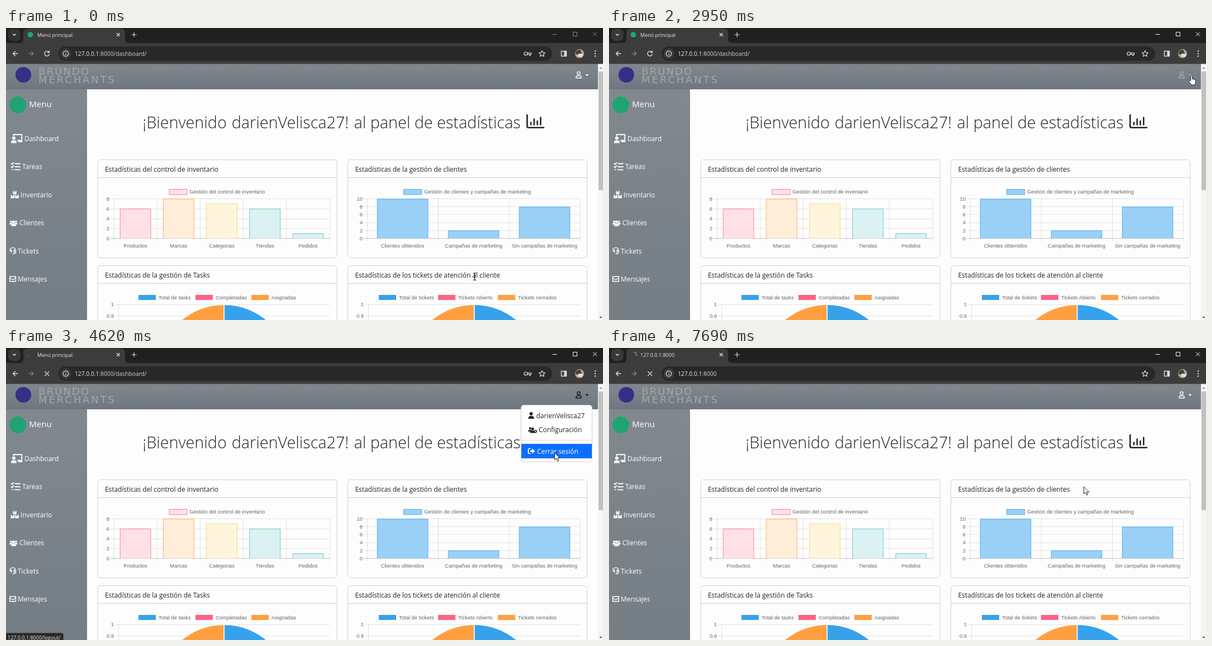
An HTML page that plays this animation: 1068x524 px, repeating every 7990 ms.

```html
<!DOCTYPE html>
<html lang="es">
<head>
<meta charset="utf-8">
<title>Menú principal</title>
<style>
  html, body { margin: 0; width: 100%; height: 100%; overflow: hidden; background: #fdfdfd; }
  svg { display: block; position: absolute; left: 0; top: 0; }
  text { font-family: "Open Sans", "Noto Sans", sans-serif; font-size: 11.9px; fill: #212529; }
  .chart text { font-family: "Liberation Sans", Arial, sans-serif; font-size: 9.45px; fill: #666; }
  .title text { font-size: 28.75px; font-weight: 300; text-anchor: middle; }
  .side text { fill: #fff; }
  .brand text { font-family: "DejaVu Sans", sans-serif; fill: #a6a6a6; }
  .ui text { fill: #e8e8e8; font-size: 9px; }
  .line { fill: none; stroke: currentColor; stroke-width: 1.4; stroke-linecap: round; stroke-linejoin: round; }
  .solid { fill: currentColor; }
  .card { fill: #fdfdfd; stroke: #d2d2d2; }
</style>
</head>
<body>
<svg width="1068" height="524" viewBox="0 0 1068 524">
  <defs>
    <linearGradient id="bar" x2="0" y2="1">
      <stop stop-color="#80888f"/><stop offset="1" stop-color="#6e777f"/>
    </linearGradient>
    <linearGradient id="pane" x2="0" y2="1">
      <stop stop-color="#81898f"/><stop offset="1" stop-color="#757d85"/>
    </linearGradient>
    <g id="person">
      <circle cy="-3" r="3"/><path d="M-5.2 6q0-5 4-5h2.4q4 0 4 5z"/>
    </g>
  </defs>

  <rect width="1068" height="524" fill="#fdfdfd"/>
  <g class="title">
    <text x="319.5" y="180">¡Bienvenido</text>
    <text x="508.5" y="180">darienVelisca27!</text>
    <text x="771.5" y="180">al panel de estadísticas</text>
  </g>
  <path d="M932.3 156v20.5q0 2.3 2.3 2.3H962M939 169.5v4M944.8 163.5v10M950.6 167v6.5M956.4 160.5v13"
        class="line" style="color:#212529;stroke-width:2.6"/>
  <g id="cards"></g>
  <g id="charts" class="chart"></g>

  <!-- scrollbar -->
  <rect x="1059" y="65" width="9" height="459" fill="#f5f5f5"/>
  <rect x="1060" y="78" width="8" height="213" fill="#c1c1c1"/>
  <path d="M1061.5 73l2.5-3 2.5 3z" fill="#858585"/>
  <path d="M1061.5 518l2.5 3 2.5-3z" fill="#505050"/>

  <!-- page header -->
  <rect y="64" width="1059" height="46" fill="url(#bar)"/>
  <circle cx="31" cy="84" r="14" fill="#34308a"/>
  <g class="brand">
    <text x="58" y="83.5" style="font-size:18.5px;letter-spacing:1.7px">BRUNDO</text>
    <text x="58" y="99" style="font-size:18px;letter-spacing:2.9px">MERCHANTS</text>
  </g>
  <g id="account">
    <g class="line"><circle cx="1024.5" cy="81" r="2.6"/><path d="M1019.7 89.8q0-4.3 3.5-4.3h2.6q3.5 0 3.5 4.3z"/></g>
    <path d="M1036.5 83h6l-3 3.2z" class="solid"/>
  </g>

  <!-- sidebar -->
  <rect y="110" width="145" height="414" fill="url(#pane)"/>
  <circle cx="21" cy="138" r="15" fill="#1fa374"/>
  <g class="side" id="side" color="#fff">
    <text x="41.3" y="142" style="font-size:15px">Menu</text>
    <path d="M13.5 193v-1.8h14.8v10.6h-7.5M23 204h5.5" class="line" style="stroke-width:1.9"/>
    <g class="solid"><circle cx="14" cy="197.5" r="3"/><path d="M9 206.5q0-5 4-5h2q4 0 4 5z"/></g>
    <path d="M9.5 243.3l1.5 1.5 2.5-3M9.5 248.8l1.5 1.5 2.5-3M11 254h.5M16.5 243.5h8.5M16.5 249h8.5M15.5 254.3h9.5" class="line" style="stroke-width:1.8"/>
    <path d="M12.5 292.5h2v2.5h2v-2.5h2.2v5.8h-6.2zM8.5 299.5h2.3v2.5h2v-2.5h2.3v6h-6.6zM16.3 299.5h2.3v2.5h2v-2.5h2.3v6h-6.6z" class="solid"/>
    <g class="solid">
      <use href="#person" transform="translate(9 349) scale(.58)"/>
      <use href="#person" transform="translate(18 349) scale(.58)"/>
      <use href="#person" transform="translate(13.5 350.5) scale(.85)"/>
    </g>
    <path d="M6.8 399.5a5.3 5.3 0 0 1 10.6 0v2.5q0 3-3 3h-2.2" class="line" style="stroke-width:1.3"/>
    <path d="M8.3 397.8h2.2v5h-2.2zM13.7 397.8h2.2v5h-2.2z" class="solid"/>
    <path d="M6.7 446h10.8v8.8h-10.8zM6.7 448.3l5.4 3.7 5.4-3.7" class="line"/>
  </g>

  <!-- account menu -->
  <g id="menu">
    <rect x="921.5" y="102.5" width="127" height="102" rx="5" fill="#fff" stroke="#d0d2d4"/>
    <path d="M922 165.5h126" stroke="#d9d9d9"/>
    <rect id="row" x="922" y="172" width="126" height="26"/>
    <g color="#212529" class="solid">
      <use href="#person" x="939.5" y="121"/>
      <use href="#person" transform="translate(937.5 146) scale(.65)"/>
      <use href="#person" transform="translate(942 147.5) scale(.85)"/>
      <circle cx="947" cy="149.5" r="2" fill="none" stroke="#212529" stroke-width="1.7"/>
    </g>
    <text x="948.5" y="126">darienVelisca27</text>
    <text x="953" y="151">Configuración</text>
    <g id="exit">
      <path d="M938 180.5h-1.5q-2 0-2 2v5q0 2 2 2h1.5" class="line" style="stroke-width:1.7"/>
      <path d="M938 183.5h3.5v-3.3l4.7 4.8-4.7 4.8v-3.3h-3.5z" class="solid"/>
      <text x="950" y="189.5" style="fill:currentColor">Cerrar sesión</text>
    </g>
  </g>

  <!-- browser -->
  <g class="ui" color="#dcdcdc">
    <rect width="1068" height="28" fill="#1f2020"/>
    <rect y="27" width="1068" height="37.5" fill="#3c3c3c"/>
    <rect id="search" x="4" y="2" width="22" height="21" rx="7"/>
    <path d="M12.5 10.8l2.5 2.5 2.5-2.5" class="line"/>
    <path d="M24 27q7 0 7-7V9q0-8 8-8h166q8 0 8 8v11q0 7 7 7z" fill="#3c3c3c"/>
    <circle id="icon" cx="43.5" cy="12" r="5" fill="#1fa374"/>
    <circle id="spin" cx="44.5" cy="12" r="4.7" pathLength="360" fill="none" stroke-width="1.4"/>
    <text id="tab" x="56" y="15.5"></text>
    <path d="M198.3 9.5l5 5m0-5l-5 5M229 8v8m-4-4h8" class="line" style="stroke-width:1.2"/>
    <path id="win" d="M977.5 11.5h8M1014.5 7.5h7v7h-7zM1050 7.5l7 7m0-7l-7 7" fill="none"/>
    <path d="M21 46h-8.5m4-4l-4 4 4 4" class="line"/>
    <path d="M40.5 46h8.5m-4-4l4 4-4 4" class="line" stroke-opacity=".4"/>
    <path id="reload" d="M77 43.7a4.3 4.3 0 1 0 .4 3.5M77.3 41.2v2.8h-2.8" class="line"/>
    <path id="stop" d="M69.8 42.5l7 7m0-7l-7 7" class="line"/>
    <rect x="94" y="33" width="883" height="26" rx="13" fill="#282828"/>
    <circle cx="107" cy="46" r="9.5" fill="#3c3c3c"/>
    <g class="line" style="stroke-width:1.2"><circle cx="107" cy="46" r="4.8"/><path d="M107 45.8v2.5M107 43.6v.1"/></g>
    <text x="123" y="49.7" style="font-size:10.25px">127.0.0.1<tspan id="path" fill="#cfcfcf"></tspan></text>
    <g id="key" class="line" style="stroke-width:1.2"><circle cx="929.8" cy="46" r="3"/><path d="M933 44.8h6.5v2.5h-1v1.8h-2v-1.8h-3.5M929.8 46h.1"/></g>
    <path d="M959 40.6l1.6 3.5 3.8.4-2.9 2.6.8 3.8-3.3-2-3.3 2 .8-3.8-2.9-2.6 3.8-.4z" class="line" style="stroke-width:1.2"/>
    <path d="M993.5 41.5h9v9h-9z" class="line"/>
    <path d="M998.5 41.5h4v9h-4z" class="solid"/>
    <circle cx="1026" cy="46" r="8" fill="#b5aa9d"/>
    <path d="M1019 43q4-6 9-3l2 5-5 3-6-1z" fill="#4a413a"/>
    <ellipse cx="1027.5" cy="49" rx="4.5" ry="3" fill="#e6dfd6"/>
    <path d="M1054 41.5h.1M1054 46h.1M1054 50.5h.1" class="line" style="stroke-width:2.4"/>
    <g id="status">
      <path d="M0 511.5h99q3.5 0 3.5 3.5v9H0z" fill="#292929" stroke="#4a4a4a"/>
      <text x="3" y="522.5">127.0.0.1:8000/logout/</text>
    </g>
  </g>

  <g id="pointer" stroke="#111" stroke-width=".9" stroke-linejoin="round">
    <path id="beam" d="M-2.5-6.5q2.5 0 2.5 1.5V5q0 1.5-2.5 1.5M2.5-6.5Q0-6.5 0-5V5Q0 6.5 2.5 6.5M-1.5 1.5h3" fill="none" stroke-width="1.1"/>
    <path id="arrow" d="M0 0v12.8l3-2.7 2 4.9 2.1-.9-2-4.7h4z" fill="#fff"/>
    <path id="hand" d="M-1.4 1.4a1.4 1.4 0 0 1 2.8 0v5l4.4 1q2 .5 1.8 2.4l-.7 4.6q-.2 1.5-.9 2.7h-6.3q-.4-1.4-1.5-2.7l-2.9-3.6q-.8-1.3.5-2t2.8 1.5z" fill="#fff"/>
  </g>
</svg>

<script>
const $ = id => document.getElementById(id);
const snap = v => Math.floor(v) + .5;
const text = (x, y, s, anchor = 'start') => `<text x="${x}" y="${y}" text-anchor="${anchor}">${s}</text>`;
const rect = (x, y, w, h, fill, stroke = 'none') =>
  `<rect x="${x}" y="${y}" width="${w}" height="${h}" fill="${fill}" stroke="${stroke}" stroke-width=".8"/>`;
const line = (x1, y1, x2, y2, alpha = .1) =>
  `<path d="M${x1} ${y1}L${x2} ${y2}" stroke="#000" stroke-opacity="${alpha}"/>`;

const BLUE = '#36a2eb', RED = '#ff6384', ORANGE = '#ff9f40';

function card(x, y, h, title) {
  return `<rect class="card" x="${x}" y="${y}" width="428" height="${h}" rx="5"/>` +
    line(x, y + 32, x + 428, y + 32, .18) + text(x + 13, y + 21, title);
}

// Bars are outlined on three sides, with the border inside
function column(x, y, w, base, fill, stroke) {
  return `<path d="M${x + .4} ${base}V${y + .4}h${w - .8}V${base}" fill="${fill}" stroke="${stroke}" stroke-width=".8"/>`;
}

function barChart(left, right, max, bars) {
  const top = 306.5, base = 377.5, unit = (base - top) / max, col = (right - left) / bars.length;
  let out = '';
  for (let v = 0; v <= max; v += 2) {
    const y = base - v * unit;
    out += line(left - 6, snap(y), right, snap(y), v ? .1 : .25) + text(left - 8, y + 3.3, v, 'end');
  }
  for (let i = 0; i <= bars.length; i++) {
    const x = snap(left + i * col);
    out += line(x, top, x, base + 6);
  }
  bars.forEach(([name, v, fill, stroke], i) => {
    const mid = left + (i + .5) * col, w = col * .72;
    out += column(mid - w / 2, base - v * unit, w, base, fill, stroke) + text(mid, 394, name, 'middle');
  });
  return out;
}

function pieChart(mid, left, right, legend) {
  const r = 118.2, top = 496.3;
  const half = (sweep, fill) =>
    `<path d="M${mid} ${top}a${r} ${r} 0 0 ${sweep} 0 ${2 * r}z" fill="${fill}" stroke="#fff" stroke-width="1.5"/>`;
  return line(left - 5, 496.5, right, 496.5) + line(left - 5, 516.5, right, 516.5) + line(left + .5, 496.5, left + .5, 524) +
    text(left - 8, 499.3, '1', 'end') + text(left - 8, 519.5, '0.9', 'end') +
    half(1, BLUE) + half(0, ORANGE) +
    legend.map(([x, name, fill]) => rect(x, 479, 31, 9, fill) + text(x + 36, 486.5, name)).join('');
}

$('cards').innerHTML =
  card(164, 236.5, 176, 'Estadísticas del control de inventario') +
  card(611.5, 236.5, 176, 'Estadísticas de la gestión de clientes') +
  card(164, 426.5, 200, 'Estadísticas de la gestión de Tasks') +
  card(611.5, 426.5, 200, 'Estadísticas de los tickets de atención al cliente');

const sky = '#9ad0f5';
$('charts').innerHTML =
  rect(292, 289.5, 32, 9.5, '#ffe0e6', RED) + text(328, 297, 'Gestión del control de inventario') +
  barChart(193, 579, 8, [
    ['Productos', 6, '#ffe0e6', RED],
    ['Marcas', 8, '#ffecd9', ORANGE],
    ['Categorias', 7, '#fff5dd', '#ffcd56'],
    ['Tiendas', 6, '#dbf2f2', '#4bc0c0'],
    ['Pedidos', 1, '#dbf2f2', '#4bb5d0']]) +
  rect(711.5, 289.5, 32, 9.5, sky, BLUE) + text(748, 297, 'Gestión de clientes y campañas de marketing') +
  barChart(646, 1027, 10, [
    ['Clientes obtenidos', 10, sky, BLUE],
    ['Campañas de marketing', 2, sky, BLUE],
    ['Sin campañas de marketing', 8, sky, BLUE]]) +
  pieChart(390, 201, 579, [[237, 'Total de tasks', BLUE], [339, 'Completadas', RED], [439, 'Asignadas', ORANGE]]) +
  pieChart(837.5, 648, 1027, [[667, 'Total de tickets', BLUE], [773, 'Tickets Abierto', RED], [880, 'Tickets cerrados', ORANGE]]);

$('side').insertAdjacentHTML('beforeend', [
  [33, 'Dashboard'], [29, 'Tareas'], [26, 'Inventario'], [24, 'Clientes'], [21, 'Tickets'], [21, 'Mensajes']
].map(([x, s], i) => text(x, 203 + i * 50.4, s)).join(''));

// The picture only refreshes at these moments: [first, last, count]
const LOOP = 7990;
const ticks = [
  [0, 0, 1], [590, 1230, 8], [1370, 1440, 2], [1600, 2330, 12], [2400, 2680, 5], [2950, 2950, 1],
  [3170, 3170, 1], [3520, 3830, 5], [4080, 4080, 1], [4320, 4320, 1], [4550, 4620, 2], [4790, 4840, 2],
  [5060, 5380, 6], [5690, 6420, 12], [6490, 6950, 8], [7360, 7360, 1], [7690, 7690, 1]
].flatMap(([a, b, n]) =>
  Array.from({ length: n }, (_, i) => n < 2 ? a : Math.floor((a + (b - a) * i / (n - 1)) / 10) * 10));

// Pointer path: [time, x, y]
const route = [
  [0, 838.5, 446], [500, 838.5, 446], [680, 745, 410], [860, 562, 340], [1040, 720, 300], [1230, 931, 299],
  [1370, 940, 235], [1440, 953, 254], [1600, 922, 250], [1800, 960, 215], [2060, 1051, 149], [2330, 1046, 107],
  [2400, 1044, 98], [2680, 1042, 85], [3440, 1042, 85], [3830, 981.5, 188], [4990, 981.5, 188],
  [5380, 853, 246], [5690, 849.5, 249], [LOOP, 849.5, 249]
];

function along(t) {
  const i = route.findIndex(p => p[0] > t);
  const [t0, x0, y0] = route[i - 1], [t1, x1, y1] = route[i];
  const k = (t - t0) / (t1 - t0);
  return [x0 + (x1 - x0) * k, y0 + (y1 - y0) * k];
}

const show = (id, on) => $(id).setAttribute('display', on ? 'inline' : 'none');
const set = (id, attrs) => { for (const k in attrs) $(id).setAttribute(k, attrs[k]); };

function draw(t) {
  const focused = t >= 2950, open = t >= 3170 && t < 4840;
  const busy = t >= 4550, moved = t >= 7360, pressed = t >= 4320;

  set('pointer', { transform: `translate(${along(t)})` });
  const shape = t < 590 ? 'beam' : t >= 2400 && t < 4620 ? 'hand' : 'arrow';
  for (const id of ['beam', 'hand', 'arrow']) show(id, id === shape);

  set('account', { color: open ? '#111' : t >= 2400 && t < 3170 ? '#a5abb0' : '#fff' });
  show('menu', open);
  set('row', { fill: pressed ? '#0d6efd' : t >= 3750 ? '#f8f9fa' : '#fff' });
  set('exit', { color: pressed ? '#fff' : '#212529' });
  show('status', t >= 4080 && t < 5180);

  set('win', { stroke: focused ? '#fff' : '#8a8a8a' });
  set('search', { fill: focused ? '#383838' : '#333' });
  show('icon', !busy);
  show('reload', !busy);
  show('stop', busy);
  show('key', !moved);
  $('tab').textContent = moved ? '127.0.0.1:8000' : 'Menú principal';
  $('path').textContent = moved ? ':8000' : ':8000/dashboard/';

  show('spin', busy);
  const arc = Math.max(1, Math.min(120, (t - 4550) * .3));
  const turn = moved ? -90 + (t - 7690) * .35 : -90 - (t - 5820) * .2;
  set('spin', {
    stroke: moved ? '#6bb5d6' : '#8a8a8a',
    'stroke-dasharray': `${arc} 360`,
    transform: `rotate(${turn} 44.5 12)`
  });
}

function frame() {
  const now = performance.now() % LOOP;
  draw(ticks.filter(t => t <= now).pop());
  requestAnimationFrame(frame);
}
frame();
</script>
</body>
</html>
```
